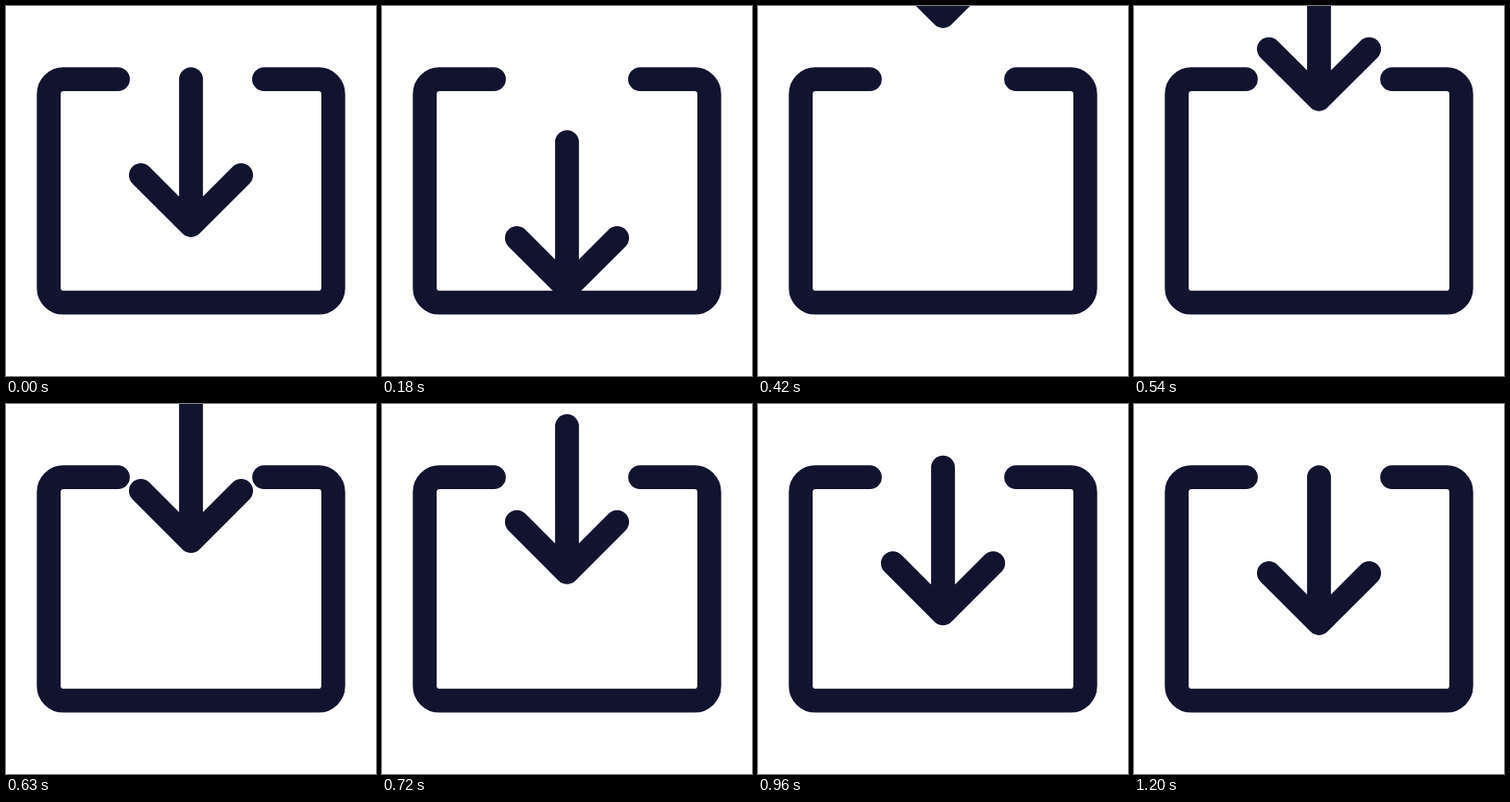
An HTML page for the animation above (3230 ms loop, 400 by 400 pixels).

```html
<!DOCTYPE html>
<html lang="en">
<head>
<meta charset="utf-8">
<title>Import icon</title>
<style>
  html, body { margin: 0; width: 100%; height: 100%; overflow: hidden; background: #fff; }
  svg { display: block; width: 100vw; height: 100vh; }
  path { fill: none; stroke: #12132f; stroke-width: 25.8; stroke-linecap: round; stroke-linejoin: round; }
</style>
</head>
<body>
<svg viewBox="0 0 400 400">
  <clipPath id="above"><rect width="400" height="333.5"/></clipPath>
  <path d="M121 79.2H62.2a16 16 0 0 0-16 16V304.7a16 16 0 0 0 16 16H337.8a16 16 0 0 0 16-16V95.2a16 16 0 0 0-16-16H279"/>
  <g clip-path="url(#above)">
    <path id="arrow" d="M200 79.2V237M145.8 182.8L200 237L254.2 182.8"/>
  </g>
</svg>
<script>
  const LOOP = 3230, STEP = 30;
  const DROP = 360, REST = 1200, SETTLE = 1430;
  const arrow = document.getElementById('arrow');

  // Accelerate down through the tray, then re-enter from above and slow down.
  function shift(t) {
    if (t >= REST) return 0;
    if (t < DROP) return 272 * (t / DROP) ** 2;
    return -284.7 * ((SETTLE - t) / (SETTLE - DROP)) ** 4;
  }

  const start = performance.now();
  function draw(now) {
    const t = Math.max(0, now - start) % LOOP;
    const y = shift(Math.floor(t / STEP) * STEP);
    arrow.setAttribute('transform', `translate(0 ${y.toFixed(2)})`);
    requestAnimationFrame(draw);
  }
  draw(start);
</script>
</body>
</html>
```
